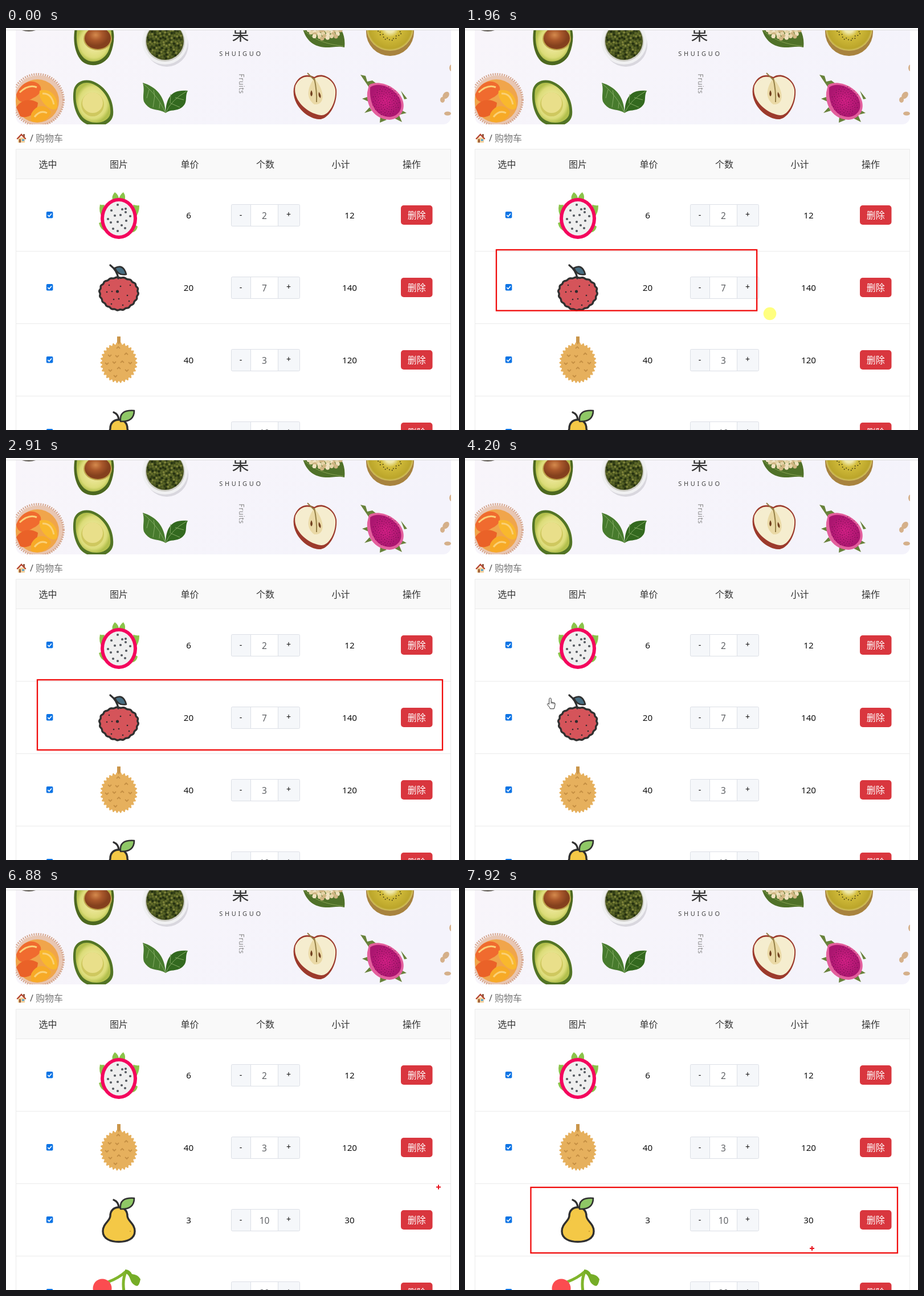
Animation of 795 by 705 pixels, one loop 7990 ms. Source, as an HTML page:

```html
<!DOCTYPE html>
<html lang="zh">
<head>
<meta charset="utf-8">
<style>
html, body { margin: 0; height: 100%; overflow: hidden; background: #fff }
svg { display: block; width: 795px; height: 705px }
text { font: 16px "Noto Sans", "Noto Sans CJK SC", "Noto Sans CJK", sans-serif; text-anchor: middle; fill: #111 }
.cjk text, text.cjk { font-family: "Noto Sans CJK SC", "Noto Sans CJK", sans-serif; fill: #333 }
.num { font-size: 15.2px }
.ink { stroke: #303030; stroke-width: 3.4; stroke-linejoin: round; stroke-linecap: round }
</style>
</head>
<body>
<svg viewBox="0 0 795 705">
  <defs>
    <clipPath id="banner"><path d="M17 4H781V155a14 14 0 0 1-14 14H31a14 14 0 0 1-14-14z"/></clipPath>
    <linearGradient id="cloth" x2="1" y2=".3"><stop stop-color="#f8f5fa"/><stop offset="1" stop-color="#f4f3fb"/></linearGradient>
    <radialGradient id="flesh"><stop offset=".3" stop-color="#eee89b"/><stop offset=".8" stop-color="#dcdc79"/><stop offset="1" stop-color="#b3c04d"/></radialGradient>
    <radialGradient id="pit" cx=".42" cy=".35"><stop stop-color="#d58a4d"/><stop offset=".5" stop-color="#a9582b"/><stop offset="1" stop-color="#84401d"/></radialGradient>
    <radialGradient id="kiwi"><stop offset=".2" stop-color="#efe9ad"/><stop offset=".4" stop-color="#d3bd3c"/><stop offset=".9" stop-color="#bba52a"/><stop offset="1" stop-color="#d4c267"/></radialGradient>
    <radialGradient id="pulp"><stop stop-color="#d11f84"/><stop offset="1" stop-color="#ab1670"/></radialGradient>
  </defs>
  <path d="M0 3.5H795" stroke="#dcdcdc"/>

  <g clip-path="url(#banner)">
    <path fill="url(#cloth)" d="M17 4H781V169H17z"/>
    <ellipse cx="40" cy="0" rx="16" ry="6" fill="#555048"/>

    <path d="M123 -8C116 15 119 44 133 58C148 71 174 66 183 46C191 27 192 5 183 -8z" fill="#4c681f"/>
    <path d="M127 -8C121 15 123 40 137 53C150 64 170 59 179 42C186 26 188 5 180 -8z" fill="url(#flesh)"/>
    <ellipse cx="161" cy="19" rx="25" ry="20" fill="#c0a64a"/>
    <ellipse cx="161" cy="18" rx="23" ry="19" fill="url(#pit)"/>

    <ellipse cx="282" cy="30" rx="38" ry="38" fill="#d9d7de"/>
    <circle cx="279" cy="24" r="40" fill="#f0f0f2"/>
    <circle cx="279" cy="24" r="35" fill="#d0cfc9"/>
    <circle cx="279" cy="23" r="33" fill="#47521f"/>
    <g id="pesto"/>

    <path d="M521 2C527 22 540 33 561 34C574 34 584 31 594 34C596 18 591 4 583 -4H521z" fill="#507129"/>
    <path d="M523 4C545 24 565 28 592 32" fill="none" stroke="#87a352"/>
    <g id="seeds"/>

    <ellipse cx="674" cy="7" rx="42" ry="42" fill="#a8833f"/>
    <ellipse cx="674" cy="0" rx="41" ry="40" fill="url(#kiwi)"/>
    <g id="kiwiSeeds"/>

    <circle cx="57" cy="127" r="44" fill="#e8c6b2"/>
    <circle cx="56" cy="126" r="45" fill="none" stroke="#d6a78f" stroke-width="4" stroke-dasharray="2 2"/>
    <circle cx="55" cy="128" r="38" fill="#f0a54b"/>
    <path d="M18 117C24 98 43 87 57 98C67 107 58 118 49 122C37 129 21 136 18 117z" fill="#f06b2f"/>
    <path d="M18 139C27 125 43 123 56 131C55 150 38 160 25 155z" fill="#ea6228"/>
    <path d="M59 110C76 104 91 119 90 138C87 147 76 142 70 136C63 129 57 120 59 110z" fill="#f9b82d"/>
    <path d="M44 151C54 131 73 135 79 148C75 162 57 169 44 163z" fill="#f7aa27"/>
    <path d="M24 113Q40 98 54 104M64 115Q80 114 84 134M50 156Q60 143 72 149" fill="none" stroke="#fbd077" stroke-width="3"/>

    <path d="M119 108C123 92 142 87 158 96C179 107 190 130 188 152C185 175 147 180 130 160C119 145 116 124 119 108z" fill="#527425"/>
    <path d="M123 109C127 96 143 92 156 100C174 110 185 131 183 150C180 168 149 172 134 156C123 142 121 124 123 109z" fill="url(#flesh)"/>
    <ellipse cx="152" cy="134" rx="20" ry="21" fill="#cfc85f"/>
    <ellipse cx="152" cy="131" rx="18" ry="18" fill="#e9df8a"/>

    <path d="M240 96C263 103 279 119 280 149C266 140 253 148 242 129C239 118 244 110 240 96z" fill="#477b2d"/>
    <path d="M280 149C281 123 289 107 319 110C313 121 320 130 309 139C298 147 289 142 280 149z" fill="#33691f"/>
    <path d="M241 98C258 112 271 128 280 149Q290 126 317 111M251 108l-4 15M261 119l-3 20M270 131l-1 10M261 119l-2-10M288 132l1-16M297 122l15 4M289 132l16 7" fill="none" stroke="#83a963"/>

    <path d="M506 101C514 81 530 80 541 86C554 76 577 88 580 108C582 135 565 161 549 160C525 158 498 130 506 101z" fill="#9c3a2c"/>
    <path d="M508 101C516 83 532 83 541 89C554 79 575 90 578 108C580 131 566 154 553 153C529 150 502 126 508 101z" fill="#f5edcf"/>
    <path d="M541 88C531 101 524 122 541 134C561 136 560 109 541 88z" fill="#ead9a6"/>
    <path d="M541 88Q546 111 545 130M529 79l12 12" fill="none" stroke="#947f45" stroke-width="2"/>
    <path d="M536 109q-4 7 0 11 4-4 0-11M549 112q-2 8 3 11 2-5-3-11" fill="#71401f"/>

    <path d="M637 104L622 82L631 84L634 94L643 92L652 99zM699 125l-6-15 11 14zM694 144l9 5-12 3zM657 155l-1 11 12-5zM681 158l14 7-6-14zM634 121l-9 3 11 5zM638 139l-9 10 13-4z" fill="#68823a"/>
    <path d="M637 100C651 91 680 99 693 120C705 140 693 160 673 161C646 160 632 137 634 113z" fill="#e35f9d"/>
    <path d="M639 104C654 94 678 103 690 122C699 140 690 154 674 156C650 156 637 134 639 104z" fill="url(#pulp)"/>
    <g id="dragonSeeds"/>

    <g fill="#d5b08a"><ellipse cx="772" cy="118" rx="5" ry="7" transform="rotate(38 772 118)"/><ellipse cx="766" cy="126" rx="4" ry="5"/><ellipse cx="775" cy="150" rx="6" ry="3.5"/><ellipse cx="782" cy="70" rx="4" ry="6"/></g>

    <text x="411.500" y="21" class="cjk" style="font-size:30px;font-weight:300">果</text>
    <text x="412.500" y="49" style="font-size:11px;letter-spacing:3.7px;fill:#444">SHUIGUO</text>
    <text transform="translate(409 98) rotate(90)" style="font-size:12px;letter-spacing:.6px;fill:#888">Fruits</text>
  </g>

  <path d="M21 192h12v9H21z" fill="#f1cf9b"/><path d="M30 186h3v5h-3z" fill="#8d5e48"/>
  <path d="M18.500 194L27 185L35.500 194L34 195.500L27 188.500L20 195.500z" fill="#b5452f"/>
  <path d="M23 195h3v6h-3z" fill="#9c5a31"/><path d="M28 195h4v3h-4z" fill="#59a4ca"/>
  <text x="45" y="199" style="fill:#555">/</text>
  <text x="76" y="199" class="cjk" style="fill:#777">购物车</text>

  <path d="M17.500 212.500H780.500V264.500H17.500z" fill="#f9f9f9" stroke="#ebebeb"/>
  <path d="M17.500 264V706M780.500 264V706" stroke="#ebebeb"/>
  <g class="cjk" id="head"/>
  <g id="rows"/>
  <rect id="box" fill="none" stroke="#f00909" stroke-width="2.300"/>
  <circle id="spot" r="11.300" fill="#ff0" fill-opacity=".5"/>
  <path id="plus" d="M-4 0H4M0-4V4" stroke="#e8111b" stroke-width="2"/>
  <g id="hand" stroke="#2b2b2b" stroke-linejoin="round">
    <path fill="#fff" d="M-1.700 1.700a1.700 1.700 0 0 1 3.400 0v5.500l5.600 1.200q1.600.5 1.400 2.200l-.8 4.400-1.300 3.800h-6.600l-1.200-2.600-3.600-4.600q-.8-1.600.8-2.100 1.200 0 2 1.600z"/>
    <path d="M1.700 7v3M4.200 8v2.500M6.600 8.500v2.500" stroke-width=".8"/>
  </g>
</svg>
<script>
const $ = id => document.getElementById(id);
const dot = (x, y, r, fill) => `<circle cx="${x}" cy="${y}" r="${r}" fill="${fill}"/>`;
const dots = (list, fill, r) => list.map(([x, y]) => dot(x, y, r, fill)).join('');

// sunflower scatter over an ellipse
function scatter(id, cx, cy, rx, ry, n, fills, r, inner = 0) {
  let s = '';
  for (let i = 0; i < n; i++) {
    const d = inner + (1 - inner) * Math.sqrt((i + .5) / n), a = i * 2.4;
    s += dot((cx + rx * d * Math.cos(a)).toFixed(1), (cy + ry * d * Math.sin(a)).toFixed(1), r, fills[i * 7 % fills.length]);
  }
  $(id).innerHTML = s;
}
scatter('pesto', 279, 23, 31, 31, 150, ['#66702b', '#303d14', '#7c8239', '#586426', '#242f10'], 2);
scatter('seeds', 560, 5, 30, 14, 42, ['#e5d3a7', '#cfb583', '#f0e2c0'], 3.6);
scatter('kiwiSeeds', 674, 0, 22, 22, 34, ['#4b4416'], 1, .7);
scatter('dragonSeeds', 667, 128, 24, 26, 120, ['#6e0d4c', '#8d125c'], .8);

// closed wavy outline; taper narrows the lower half
function ring(cx, cy, rx, ry, waves, depth, taper = 0) {
  const pts = [];
  for (let i = 0; i < waves * 8; i++) {
    const a = i / waves / 8 * 2 * Math.PI, k = 1 + depth * Math.cos(a * waves);
    pts.push((cx + rx * k * Math.cos(a) * (1 - taper * Math.sin(a))).toFixed(1) + ' ' + (cy + ry * k * Math.sin(a)).toFixed(1));
  }
  return 'M' + pts.join('L') + 'z';
}

// icons are centred on their row
const dragon = `
  <path fill="#8bc34a" d="M-11-26Q-13-34-7-40Q0-35 0-28Q2-36 8-40Q13-33 10-25zM25-18Q35-16 36-17Q36-3 29 4zM-25-18Q-33-17-33-19Q-36-5-29 4zM-35 14Q-32 27-22 28L-30 12zM33 20Q31 31 19 31L28 17z"/>
  <ellipse cy="6" rx="32" ry="36" fill="#f4055d"/><ellipse cy="6" rx="26" ry="30" fill="#efefef"/>` +
  dots([[-2,-18],[6,-10],[12,-11],[-13,-8],[12,-5],[-7,1],[3,0],[20,2],[-19,7],[-14,13],[-2,12],[13,10],[5,18],[-10,24],[-2,28],[11,23]], '#555a60', 2.1);

const berry = `
  <path class="ink" fill="#d5545a" d="${ring(0, 11, 33.5, 28.5, 19, .022, .1)}"/>
  <path class="ink" fill="none" d="M-15-39Q-3-30-1-16"/>
  <path class="ink" fill="#476e82" style="stroke-width:2.600" d="M-7-34Q8-42 13-23Q-1-20-7-34z"/>
  ${dots([[-17,-4],[3,-2],[20,-4],[-21,8],[-12,7],[15,14],[-9,21],[0,20],[-13,29],[7,31],[18,24]], '#302b2e', 1.3)}${dot(-2.5, 7, 2.6, '#302b2e')}`;

const durian = `
  <path fill="#ca964b" d="M-3-41h6v15h-6z"/>
  <path fill="#e6b05d" d="${ring(0, 5, 31, 34, 30, .055)}"/>
  <path fill="none" stroke="#c58f43" stroke-width="1.800" d="${[[-1,-20],[-16,-9],[-3,-8],[13,-9],[-21,5],[-8,3],[6,5],[20,4],[-15,17],[0,16],[14,17],[-6,27]]
    .map(([x, y], i) => `M${x - 3} ${y}l3 ${i % 3 ? 3 : -3} 3 ${i % 3 ? -3 : 3}`).join('')}"/>`;

const pear = `
  <path class="ink" fill="none" d="M0-22Q-1-32-9-35"/>
  <path class="ink" fill="#f4c846" d="M0-22C10-22 15-15 15-7C15 2 28 6 28 20C28 33 15 38.500 0 38.500S-28 33-28 20C-28 6-15 2-15-7C-15-15-10-22 0-22z"/>
  <path class="ink" fill="#8fc866" style="stroke-width:2.600" d="M3-19Q0-40 27-38Q27-18 3-19z"/>${dot(20, 20, 1, '#c28b28')}`;

const cherry = `
  <path fill="none" stroke="#80b52c" stroke-width="5" d="M-19-18Q0-25 13-37Q4-20 11 8"/>
  <path fill="#75ad27" d="M11-40Q19-40 23-32Q34-31 38-23Q36-12 32-11Q23-13 20-23Q17-32 11-34z"/>
  ${dot(-29, -7, 16.5, '#fb4c50')}${dot(12, 20, 17, '#f43f46')}`;

[['选中', 73.5], ['图片', 198], ['单价', 322.5], ['个数', 455], ['小计', 587.5], ['操作', 712]]
  .forEach(([s, x]) => $('head').innerHTML += `<text x="${x}" y="245">${s}</text>`);

const rows = [[dragon, 6, 2], [berry, 20, 7], [durian, 40, 3], [pear, 3, 10], [cherry, 34, 20]];
$('rows').innerHTML = rows.map(([icon, price, count]) => `<g>
  <path d="M17 63.500H781" stroke="#ebebeb"/>
  <rect x="70.800" y="-6" width="11.600" height="11.600" rx="2" fill="#0b74e5"/>
  <path d="M73.300 0l2.400 2.500 4.300-5" fill="none" stroke="#fff" stroke-width="1.700"/>
  <g transform="translate(198)">${icon}</g>
  <text class="num" x="320.500" y="6">${price}</text>
  <rect x="395.500" y="-18.500" width="120" height="38" rx="2" fill="#f5f7fa" stroke="#dcdfe6"/>
  <path d="M429.500-18.500H477.500V19.500H429.500z" fill="#fff" stroke="#dcdfe6"/>
  <text x="412" y="5" style="font-size:14px">-</text>
  <text x="496" y="4" style="font-size:14px">+</text>
  <text x="453.500" y="7" style="font-size:15.500px;fill:#606266">${count}</text>
  <text class="num" x="603" y="6">${price * count}</text>
  <rect x="693" y="-17" width="55.500" height="34" rx="5" fill="#d9363e"/>
  <text class="cjk" x="720.800" y="6" style="fill:#fff">删除</text></g>`).join('');
const rowEls = [...$('rows').children];

// pointer keys: time, x, y, eased
const keys = [
  [590, 741, 695], [1330, 164, 423, 1], [1400, 150, 421], [1680, 55, 389, 1], [1750, 55, 389],
  [1960, 535, 501], [2170, 692, 514], [2380, 766, 512], [2910, 766, 512],
  [3220, 712, 468], [3530, 664.5, 500, 1], [4199, 664.5, 500], [4200, 149.5, 421], [4400, 153, 421],
  [5130, 728, 467, 1], [5200, 739, 451.5], [6340, 739, 455], [6810, 759, 524.5, 1], [6930, 759, 524.5],
  [7080, 577, 631], [7220, 300, 646], [7430, 115.5, 640], [7570, 115.5, 640], [7920, 609, 632, 1]];
function pos(t) {
  const i = keys.findIndex(k => k[0] > t);
  if (i < 1) return keys[i < 0 ? keys.length - 1 : 0].slice(1, 3);
  const a = keys[i - 1], b = keys[i];
  let u = (t - a[0]) / (b[0] - a[0]);
  if (b[3]) u = u * u * (3 - 2 * u);
  return [a[1] + (b[1] - a[1]) * u, a[2] + (b[2] - a[2]) * u];
}

// the picture advances in 70 ms ticks counted from these times
const ticks = [0, 590, 630, 2910, 2970, 3860, 4200, 4400, 4430, 5550, 6340, 6390, 7010];
const boxes = [[1750, 4200, 2910, 55, 389], [6930, 7990, 7570, 759, 525]];
const presses = [[1750, 2910], [3860, 3930], [5550, 5620], [6930, 7570]];
const show = (el, on) => el.style.display = on ? '' : 'none';

function draw(now) {
  const time = now % 7990, start = ticks.filter(s => s <= time).pop();
  const t = start + Math.floor((time - start) / 70) * 70;

  const gone = t >= 5690;
  rowEls.forEach((el, i) => {
    show(el, !(gone && i === 1));
    el.setAttribute('transform', `translate(0 ${328 + 127 * (gone && i > 1 ? i - 1 : i)})`);
  });

  const box = boxes.find(([from, to]) => t >= from && t < to);
  show($('box'), box);
  if (box) {
    const [, , release, ax, ay] = box, [x, y] = pos(Math.min(t, release) - 10);
    Object.entries({ x: Math.min(ax, x), y: Math.min(ay, y), width: Math.abs(x - ax), height: Math.abs(y - ay) })
      .forEach(([k, v]) => $('box').setAttribute(k, v));
  }

  const [x, y] = pos(t);
  const pressed = presses.some(([from, to]) => t >= from && t < to);
  const crossed = t >= 1400 && t < 4200 || t >= 6340;
  for (const id of ['spot', 'plus', 'hand']) $(id).setAttribute('transform', `translate(${x} ${y})`);
  show($('spot'), pressed);
  show($('plus'), crossed && !pressed && t !== 2910);
  show($('hand'), !crossed && t >= 590);
  requestAnimationFrame(() => draw(performance.now()));
}
draw(performance.now());
</script>
</body>
</html>
```
